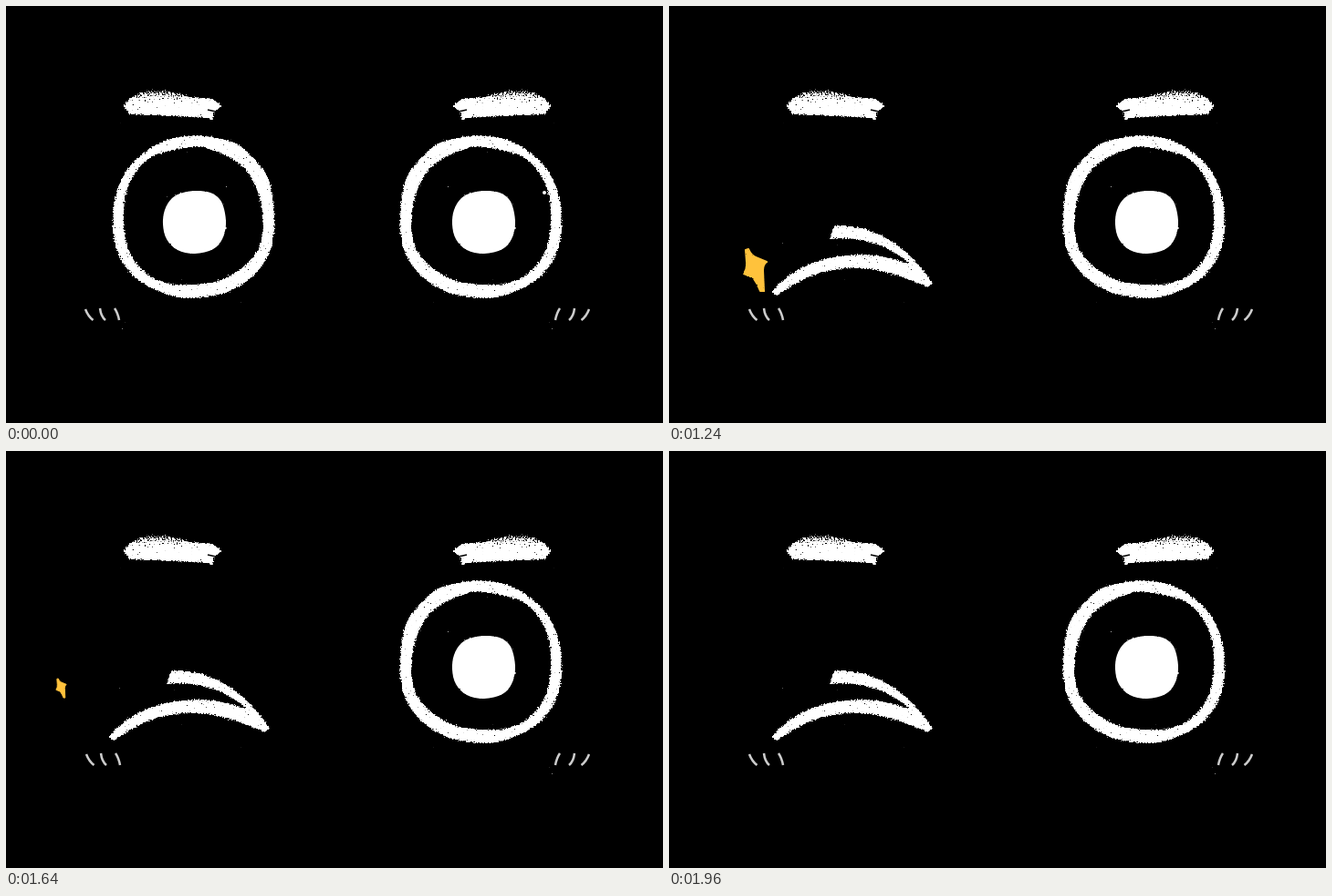
An HTML page that plays this animation: 720 px wide and 458 px high, repeating every 2.04 s.

```html
<!DOCTYPE html>
<html lang="en">
<head>
<meta charset="utf-8">
<title>Wink</title>
<style>
  html, body { margin: 0; width: 100%; height: 100%; overflow: hidden; background: #000; }
  svg { display: block; width: 720px; height: 458px; }
  .open, .wink, .star { animation: 2040ms step-end infinite; }
  .open { animation-name: open; }
  .wink { animation-name: wink; }
  .star { animation-name: star; }
  .lashes { animation: nudge 2040ms step-end infinite; }
  @keyframes open { 0% { visibility: visible; } 60.784%, 100% { visibility: hidden; } }
  @keyframes wink { 0% { visibility: hidden; } 60.784%, 100% { visibility: visible; } }
  @keyframes nudge { 0% { transform: none; } 60.784%, 100% { transform: translateX(1px); } }
  @keyframes star {
    0% { visibility: hidden; transform: translate(80px, 265px); }
    60.784% { visibility: visible; transform: translate(80px, 265px); }
    70.588% { visibility: visible; transform: translate(60px, 258px) scale(.66, .72); }
    80.392% { visibility: visible; transform: translate(54px, 249px) scale(.45, .46); }
    90.196%, 100% { visibility: hidden; transform: translate(54px, 249px) scale(.45, .46); }
  }
</style>
</head>
<body>
<svg viewBox="0 0 720 458" fill="#fff">
  <defs>
    <!-- Grain that eats into the blurred edge of a shape -->
    <filter id="chalk" x="-10%" y="-20%" width="120%" height="140%" color-interpolation-filters="sRGB">
      <feGaussianBlur in="SourceAlpha" stdDeviation="1.3" result="soft"/>
      <feTurbulence type="fractalNoise" baseFrequency=".63" numOctaves="3" seed="4" result="grain"/>
      <feComposite in="soft" in2="grain" operator="arithmetic" k2="1" k3="1.4" k4="-1.22"/>
      <feComponentTransfer result="mask"><feFuncA type="linear" slope="8"/></feComponentTransfer>
      <feFlood flood-color="#fff"/>
      <feComposite in2="mask" operator="in"/>
    </filter>
    <filter id="rough" x="-15%" y="-15%" width="130%" height="130%" color-interpolation-filters="sRGB">
      <feTurbulence type="fractalNoise" baseFrequency=".3" numOctaves="2" seed="2"/>
      <feDisplacementMap in="SourceGraphic" scale="2" xChannelSelector="R" yChannelSelector="G"/>
    </filter>
    <!-- Thin chalk along the top of a brow -->
    <linearGradient id="fade" x1="0" y1="0" x2="0" y2="1">
      <stop offset="0" stop-color="#fff" stop-opacity=".5"/>
      <stop offset=".45" stop-color="#fff"/>
    </linearGradient>
    <path id="ring" fill-rule="evenodd" filter="url(#chalk)"/>
    <path id="pupil" filter="url(#rough)"/>
    <g id="brow">
      <path d="M128 110 C135 99 148 92 166 92 C182 91 194 98 206 100 L226 101 L237 110 L229 116 L226 126 L221 123 C200 122 165 120 136 119 Z" fill="url(#fade)" filter="url(#chalk)"/>
      <path d="M221 114 L230 116" stroke="#000" stroke-width="1.5"/>
    </g>
    <path id="lash" d="M87 333 Q90 341 95.500 345 M103 332 Q104 341 109 345 M119 332 Q122.500 337 124 345" fill="none" stroke="#ccc" stroke-width="2.500"/>
  </defs>

  <rect width="720" height="458" fill="#000"/>

  <use href="#brow"/>
  <g class="lashes"><use href="#lash"/></g>
  <g class="open">
    <use href="#ring"/>
    <use href="#pupil"/>
    <circle cx="590" cy="205" r="2"/>
  </g>
  <g class="wink" filter="url(#chalk)">
    <path d="M112 314 C133 289 165 273 210 273 C235 273 252 279 265 284 C244 267 220 253 175 256 L181 241 C228 240 262 264 289 304 L284 309 C262 301 240 289 205 288 C165 288 139 303 118 319 Z"/>
  </g>

  <g transform="translate(726) scale(-1 1)">
    <use href="#brow"/>
    <use href="#lash"/>
    <use href="#ring"/>
  </g>
  <use href="#pupil" x="317"/>

  <g class="star">
    <path d="M4 3 L7 2 Q10 9 15 11 L27 16 Q23 19 23 25 L24 48 L20 48 Q17 40 12 33 L2 29 Q6 23 5 16 Z" fill="#ffc23c" stroke="#ffc23c" stroke-width="2" stroke-linejoin="round" filter="url(#rough)"/>
  </g>
</svg>
<script>
  // Closed smooth curve through x,y pairs
  function smooth(text) {
    const pts = text.split(' ').map(p => p.split(',').map(Number));
    const at = i => pts[(i + pts.length) % pts.length];
    let d = 'M' + pts[0];
    pts.forEach((p, i) => {
      const [a, c, e] = [at(i - 1), at(i + 1), at(i + 2)];
      const out = p.map((v, k) => v + (c[k] - a[k]) / 6);
      const into = c.map((v, k) => v - (e[k] - p[k]) / 6);
      d += `C${out} ${into} ${c}`;
    });
    return d + 'Z';
  }

  const draw = (id, ...loops) =>
    document.getElementById(id).setAttribute('d', loops.map(smooth).join(''));

  draw('ring',
    '206,142 232,145 254,152 274,170 288,190 294,226 292,261 281,285 263,303 238,316 200,321 171,315 146,302 129,284 119,260 117,235 119,212 128,187 147,164 176,147',
    '206,155 225,158 246,167 264,182 276,205 281,230 280,255 272,274 255,290 231,302 196,306 167,301 145,285 133,262 129,235 132,205 145,179 166,163');
  draw('pupil',
    '172,240 174,224 182,211 194,205 209,203 224,205 234,212 239,223 241,240 237,256 227,267 207,272 188,268 176,256');
</script>
</body>
</html>
```
